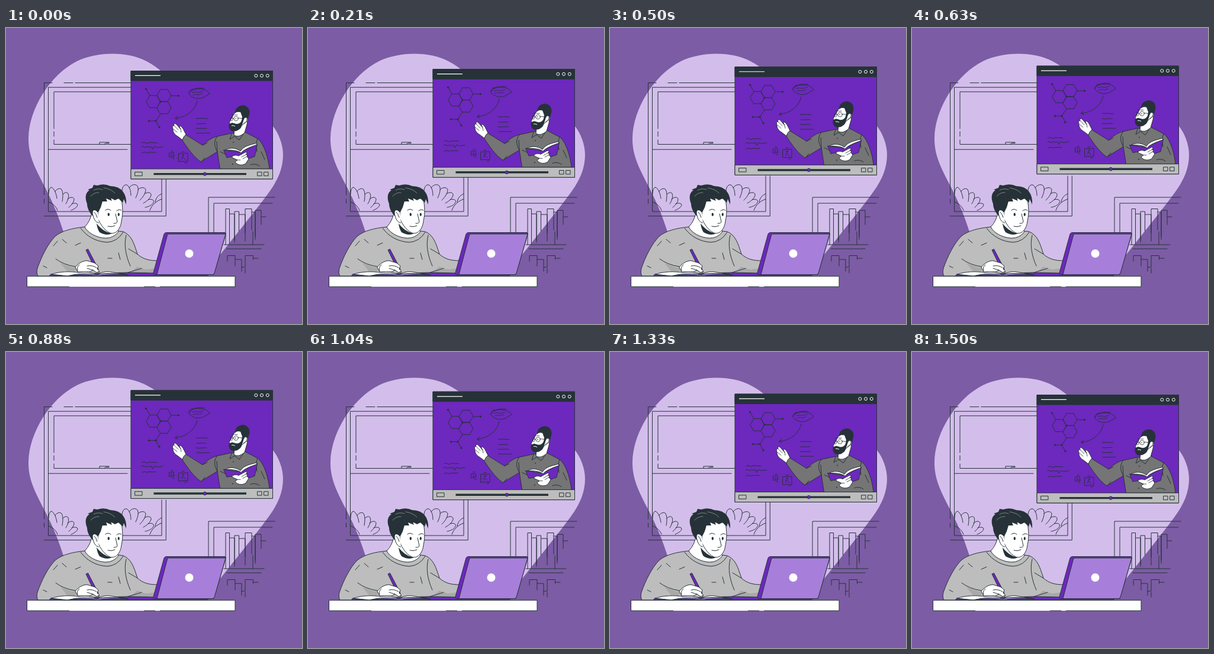
These frames come from a looping animation (500x500 px, 1540 ms). An HTML page:

```html
<!DOCTYPE html>
<html lang="en">
<head>
<meta charset="utf-8">
<title>Online lesson</title>
<style>
html, body { margin: 0; width: 100%; height: 100%; overflow: hidden; background: #7c5ca4; }
svg { display: block; width: 100vw; height: 100vh; }
.ln { fill: none; stroke: #263238; stroke-width: 1; stroke-linecap: round; stroke-linejoin: round; }
.thin { stroke-width: .8; }
.ink { fill: #263238; }
.edge { stroke: #263238; stroke-width: 1; stroke-linejoin: round; }
.white { fill: #fff; }
.grey { fill: #bdbdbd; }
.shirt { fill: #757575; }
.violet { fill: #6d28be; }
.lilac { fill: #a77fdb; }
</style>
</head>
<body>
<svg viewBox="0 0 500 500">
  <path fill="#d3beeb" d="M38 185C39 137 74 79 120 56C154 40 204 39 237 56C280 77 288 116 335 128C380 139 432 141 451 166C460 177 468 196 468 214C468 237 459 257 446 275C434 292 418 312 403 331L364 380L330 418H130C110 395 106 369 97 344C88 316 80 297 67 271C51 240 37 216 38 185Z"/>

  <g id="room" class="ln">
    <path d="M78 92.600H64.500V282M64.500 289V296M98 92.600H113M117 92.600H212M212 100.200H71.500V310H263V250M212 107.800H81V170M81 175V183M81 189V196.500H212M72 205.200H205M64.500 317.700H270.300V250"/>
    <path d="M158 196V193H174V194.500H168.500L166.500 196"/>
    <path d="M342 345V286H454M351 345V296H450M368 366H436M373 373H431"/>
    <path d="M371 366V305.500H377.500V364M377.500 314H386V362M386 358V310H393.500V343M393.500 315H404V360M404 346V305.500H415V341M415 311H421V357M421 352V308H431V332M431 319H439M417 344V366"/>
    <path d="M374 394V384.500H387V391H398V404H404V384.500H417.500V391M417.500 389H426M404 406V414M387 391V402M398 404V411"/>
    <path d="M72 281C72 274 74 269 77 269C82 272 85 280 86 288M83 276C86 271 92 270 94 273C97 279 96 286 95 293M96 281C100 277 104 277 105 280C107 286 104 292 101 297M104 289C109 285 114 285 115 289C115 294 110 300 106 303M111 297C116 295 121 296 121 299C120 303 115 306 110 308M72 294C79 296 85 302 87 308"/>
    <path d="M196 276C196 268 200 264 204 265C209 268 211 275 211 283M208 270C212 264 219 263 222 267C225 272 222 281 219 287M223 273C228 268 235 269 236 273C236 280 230 287 226 291M234 280C240 276 246 278 245 283C243 289 237 293 232 296M240 290C247 288 251 291 249 295C246 300 240 302 235 303M263 280C256 283 253 288 252 294M263 289C254 292 246 299 243 308"/>
  </g>

  <g id="screen">
    <rect class="edge violet" x="211" y="72.500" width="239.500" height="182.500"/>
    <path class="edge ink" d="M211 72.500H450.500V89H211Z"/>
    <g fill="none" stroke="#fff">
      <path stroke-width="1.200" d="M218 80.400H261"/>
      <circle cx="422.300" cy="80.600" r="2.500"/><circle cx="432" cy="80.600" r="2.500"/><circle cx="441.800" cy="80.600" r="2.500"/>
    </g>

    <g class="ln">
      <path id="rings"/>
      <path d="M243 114L236.500 103M279 114.400H291.500M261 145L253 157H241.500M253 157L259 167.500"/>
      <g id="dots" fill="#263238" stroke="none"></g>
      <path d="M315 103C307 107 307 112 314 116C320 120 328 120 334 117L344 111C341 106 335 103 327 103C318 102 310 106 309 111M313 105Q322 100 335 102"/>
      <path class="thin" d="M314 109L320 108L325 109L333 107M316 113L321 112L325 113L331 111"/>
      <path d="M323 123C319 140 304 151 286 152.500M290 149L285.500 152.500L290 154.500"/>
      <path d="M321 152.500L325 153L328 152.500L340 153M322 161.500L326 162L329 161.500H338M321 169.500L327 170L331 169.500H339M322 177.700H344"/>
      <path d="M230 194L233 193L238 195L242 193.500L255 194M229 201L232 200L236 202L240 200L243 202L246 200L248 205L251 200L256 202L265 200.500M230 211L234 209.500L238 211L241 210H253"/>
      <path d="M276 211L283 210.500L284 217.500L276 218ZM279 208H282M279 213V216L282 215M281 220L284 221M292 212L307 211.500V225L292 225.500ZM297 209.500L301 209M297 215L301 214L297 219V222M298 218L303 222M302 228L306 227"/>
    </g>

    <g id="teacher" class="edge">
      <path class="white" d="M304 180L299 170C296 166 294 164 293 167L295 171L288 163C285 160 283 162 284 165C281 164 281 168 282 171C282 176 285 180 290 183L298 189Z"/>
      <path class="ln thin" d="M284 165L291 172M282 170L289 176M295 171L296 176"/>
      <path class="shirt" d="M304 180.500L332 198C341 190 348 185 357 183L380 178L404 176L425 187C435 194 443 218 445 238H361.500L357 209L329 226C316 217 307 203 298 190C299 185 301 182 304 180.500Z"/>
      <path class="ln" d="M357 183C351 190 351 199 357 209M357 209L356 192M332 198L340 194M330 226L336 219M425 187Q421 195 424 209M413 231Q421 228 428 233M362 209L370 213M431 209L437 222M381 179L378 188L386 183L394 189L403 176"/>
      <path class="white" d="M386 170L385 181Q393 186 403 177L407 163L409 150L399 155Z"/>
      <path class="white" d="M388 141C383 148 380 155 377 160L379 163L378 169Q389 176 399 164L408 157L408 142Z"/>
      <path class="ink" stroke="none" d="M387 144C387 136 392 131 400 130.500C408 131 412 137 411.500 144L409 153L404 151L401 157L398 166C396 172 388 176 381 174C377 172 375.500 166 377 162L382 160L389 162Q396 162 398 156L399 150L396 142Q391 140 387 144Z"/>
      <path d="M381 165Q384 164 387 166" fill="none" stroke="#fff"/>
      <path class="white thin" d="M401.500 155C402 150 407 150 407 154Q406 160 401 161"/>
      <g class="ln thin"><circle cx="388.500" cy="153" r="3.700"/><path d="M384.700 153H382.700M392 152L402 153M382.500 150C379 149 378 156 381 157Q384 156 382.500 150M386 147H391M381 147L384 146"/></g>
      <circle class="ink" stroke="none" cx="388" cy="153" r=".8"/>
      <path class="violet" d="M367.500 206L373 219C384 216 392 218 400 224L420 217L424.500 196L396 210Z"/>
      <path class="white" d="M370 206C379 201 389 203 396 208C402 199 411 198 423 194.500L424 197C413 201 402 205 397 211C390 206 380 206 370 206Z"/>
      <path class="white" d="M382 217C386 214 390 215 393 216L404 210C407 209 408 212 405 214L408 214L407 217L410 221L405 229C397 234 389 230 387 226L391 223L382 219Z"/>
      <path class="ln thin" d="M405 214L398 218M407 217L400 221M391 223L396 223"/>
      <circle class="ink" stroke="none" cx="383" cy="230" r="1"/><circle class="ink" stroke="none" cx="384" cy="193" r=".9"/>
    </g>

    <path class="edge grey" d="M211 238H450.500V255H211Z"/>
    <path class="ln" d="M218 243.300H230V249.700H218ZM425 243.300H432V249.700H425ZM436 243.300H443V249.700H436Z"/>
    <path stroke="#263238" stroke-width="3.400" d="M249.500 246.600H406"/>
    <circle class="edge violet" cx="335.800" cy="246.600" r="2.700"/>
  </g>

  <g id="student">
    <path class="edge grey" d="M256 393C243 393 232 391 222 382C216 363 212 350 198 344L133 336C113 338 95 342 83 352C71 364 60 386 53 406Q51 414 54 419H256Z"/>
    <path fill="#a9a9a9" d="M92 397L111 404L121 404L116 412L104 412ZM222 403L236 408L254 406V413H210Z"/>
    <path class="ln" d="M84 390Q97 400 117 403M203 350C199 366 202 384 210 402M222 382L207 373M206 413L229 406M87 360L80 368M95 357L102 363M63 402L69 405M117 367L126 363M190 380L193 391M172 389H179"/>
    <path class="edge white" d="M146 308Q143 326 133 336C138 346 152 354 168 355Q182 355 190 344L183 335Z"/>
    <path class="ln" d="M126 338C136 352 152 361 171 362Q188 361 198 345"/>
    <path class="ink" d="M153 330C159 338 167 345 179 347Q170 352 158 345Q154 339 153 330Z"/>
    <path class="edge white" d="M155 287L152 312C156 328 165 341 175 346C187 350 194 337 195 326C198 313 197 302 195 288Z"/>
    <path class="ink" d="M147 318C141 312 137 304 137 297C133 287 134 278 141 274L138 273L146 270L148 265L154 266Q166 262 176 267Q191 267 198 277Q204 285 203 298L199 289L197 295L190 288L184 291L177 287L179 292L169 288L171 293L163 293L160 303L156 311L155 322Z"/>
    <path class="edge white" d="M155 311C149 304 144 308 147 317C149 325 153 329 157 329"/>
    <g class="ln">
      <path d="M149 311Q152 313 154 320M185 314L188 327Q187 331 182 330M172 335Q178 337 184 334M168 308Q172 304 177 308M187 309Q191 305 195 308"/>
      <path d="M148 274Q155 270 163 273M165 270Q178 272 184 279M143 284Q150 277 157 278" stroke="#fff" stroke-width=".4"/>
    </g>
    <ellipse class="ink" cx="173.300" cy="315" rx="1.700" ry="2.800"/><ellipse class="ink" cx="190.300" cy="315" rx="1.600" ry="2.700"/>
  </g>

  <g id="desk" class="edge">
    <path class="violet" d="M73 419L76 415.500H103L208 413L250 414L342 416L340 419Z"/>
    <path class="white" d="M77 416C91 411 108 411 123 413Q140 410 154 417Q127 414 104 419Z"/>
    <path class="lilac" d="M104 419Q130 412 154 417C168 411 184 413 207 417Q178 415 154 419Q130 415 104 419Z"/>
    <path class="white" d="M154 416Q168 409 182 413L202 416Q172 413 154 416Z"/>
    <path class="violet" d="M135 375L138.500 373.500L155 405L157 413L151 408Z"/>
    <path class="white" d="M117 404C122 398 129 393 137 393L150 397L156 402L154 407L158 411L153 413L147 409L141 412H121Z"/>
    <path class="ln" d="M137 402Q146 400 153 405M137 406L147 409M124 400Q119 403 121 410"/>
    <path class="white" stroke="none" d="M35.500 419.300H387V437H35.500Z"/>
    <path fill="none" d="M107 437H35.500V419.300H387V437H260M252 437H233"/>
    <path class="violet" d="M248.500 415L267 348Q268 345.500 271 345.500H370Q372 346 371 349L351 416.500H250Z"/>
    <path class="lilac" d="M255 416.500L272.500 350Q273 348 275 348H371L352 414Q351 416.500 349 416.500Z"/>
    <circle cx="309.500" cy="381" r="7" fill="#fff" stroke="none"/>
  </g>
</svg>
<script>
const $ = id => document.getElementById(id);

const hexagon = ([x, y]) =>
  `M${x - 12} ${y}L${x - 6} ${y - 10.3}H${x + 6}L${x + 12} ${y}L${x + 6} ${y + 10.3}H${x - 6}Z`;
$('rings').setAttribute('d', [[249, 124.300], [267, 114], [267, 134.600]].map(hexagon).join(''));

const atoms = [[236.500, 103], [291.500, 114.400], [253, 157], [241.500, 157], [259, 167.500], [261, 124.300]];
$('dots').innerHTML = atoms.map(([x, y]) => `<circle cx="${x}" cy="${y}" r="1.600"/>`).join('');

// The window floats up and down linearly, drawn at 24 steps a second.
const LOOP = 1540, FPS = 24, PERIOD = 1500, RISE = 10, LEAD = 28;
const player = $('screen');
const start = performance.now();

function lift(t) {
  const p = ((t + LEAD) % PERIOD) / PERIOD;
  return RISE * (1 - Math.abs(2 * p - 1)) - RISE * 2 * LEAD / PERIOD;
}

function draw(now) {
  const t = Math.max(0, now - start) % LOOP;
  const step = Math.floor(t * FPS / 1000 + .1);
  player.setAttribute('transform', `translate(0 ${-lift(step * 1000 / FPS).toFixed(3)})`);
  requestAnimationFrame(draw);
}
draw(start);
</script>
</body>
</html>
```
